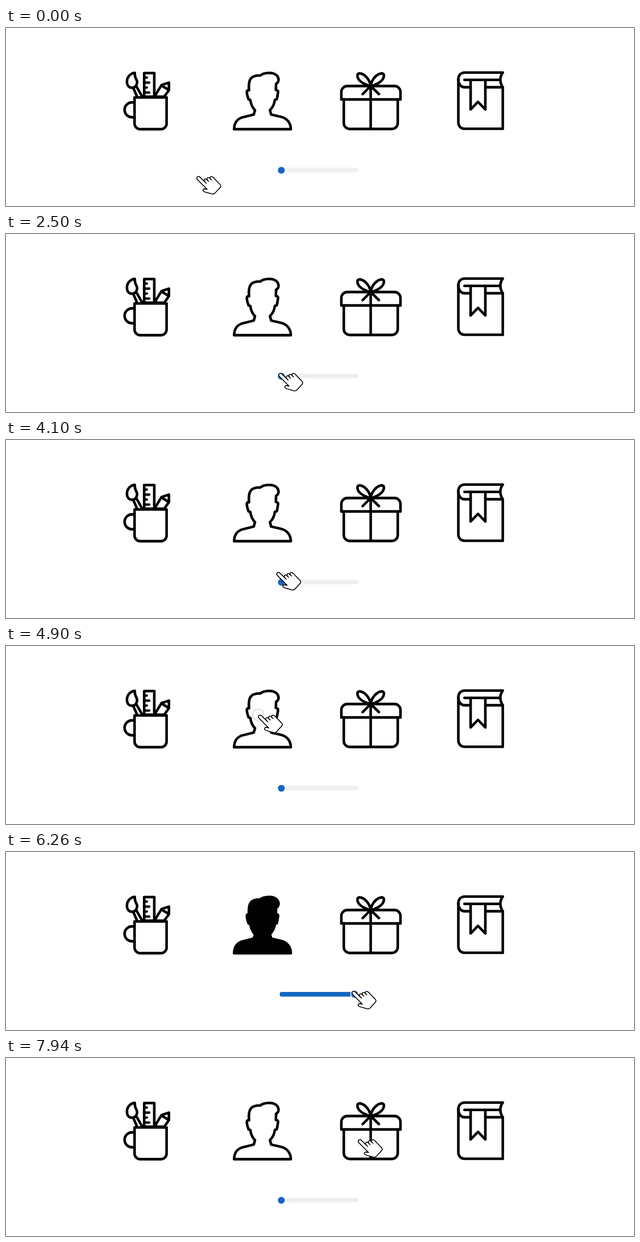
These frames come from a looping animation (1280x365 px, 8000 ms). An HTML page:

```html
<!DOCTYPE html>
<html lang="en">
<head>
<meta charset="utf-8">
<title>Icon fill slider</title>
<style>
  html, body { margin: 0; width: 100%; height: 100%; overflow: hidden; background: #fff; }
  svg { display: block; width: 100vw; height: 100vh; }
  .icon { fill: none; stroke: #000; stroke-width: 5.3; stroke-linecap: round; stroke-linejoin: round; }
  .solid { fill: #000; stroke: none; }
</style>
</head>
<body>
<svg viewBox="0 0 1280 365">
  <defs>
    <path id="mugShape" d="M262 142.3H327.3V196A11.5 11.5 0 0 1 315.8 207.5H273.5A11.5 11.5 0 0 1 262 196Z
      M262.5 92C252 93 246.5 102 246.5 110C246.5 118 251 122.5 257 122.5C264 122.5 268 116 267 109C266 104 262 103 262.5 92Z
      M281.7 141V92.3H302.2V141Z
      M302.5 141L317 117L332 112V127.5L322.5 141Z"/>
    <path id="personShape" d="M465 207.5C465 194 472 185 485 182.5L505 177.5L507.5 168.5C502 163 499 156 498 147.5
      L494.5 146.5C492.5 141 490.5 135 491 131C491 128.5 493 127.5 495.5 127.5C494.5 119 495 112 497 107
      C500 100 508 97 518 97.5C524 92.5 534 91.5 542 92.5C550 94 555 99 555.5 106C555.5 110 553 113 550.5 114.5
      L550 127C553 127.5 555 129 554.5 131.5C554 136 553 141 552 146L548 147.5C547 156 543.5 163 538 168.5
      L540.5 177.5L560 182C573 185 580.5 195 580.5 207.5Z"/>
  </defs>

  <use id="mugFill" href="#mugShape" class="solid"/>
  <use id="personFill" href="#personShape" class="solid"/>

  <g class="icon">
    <use href="#mugShape"/>
    <path d="M261 152.5H257A15.2 15.2 0 0 0 257 183H261"/>
    <path d="M259.5 123L267 140.5M266.5 121L277.5 140.5M317 118L331 126.5"/>
    <path d="M282 101.7H287M282 112H292M282 122.2H287M282 132.3H292" stroke-width="4.8"/>
  </g>
  <g class="icon"><use href="#personShape"/></g>
  <g class="icon">
    <path d="M683.5 146.5V131A12 12 0 0 1 695.5 119H792A12 12 0 0 1 804 131V146.5Z"/>
    <path d="M688.5 146.5V195A12 12 0 0 0 700.5 207H786.5A12 12 0 0 0 798.5 195V146.5M743.3 119V207"/>
    <path d="M743.3 119C741.5 105 730 93 720 93C714 94 716 103 721 108C727 114 735 117 743.3 119
      C745 105 756.5 93 766.5 93C772.5 94 770.5 103 765.5 108C759.5 114 751.5 117 743.3 119"/>
    <path d="M727 135.5L743.3 119L760 135.5"/>
  </g>
  <g class="icon">
    <path d="M1012.5 91.3H935C927 91.3 922 97 922 105V194.5A12.5 12.5 0 0 0 934.5 206.7H1012.5V121.5
      C1006 112 1006 100 1012.5 91.3"/>
    <path d="M922 105C922 115 927 121.5 935 121.5H945M979 121.5H1012.5M934.5 106.3H1006"/>
    <path d="M947 106.3V167L962 151.5L977 167V106.3"/>
  </g>

  <rect x="558" y="286.5" width="160.5" height="9.5" rx="4.5" fill="#f0f0f0"/>
  <rect id="bar" x="558" y="287" height="9.6" rx="3.5" fill="#1565c0"/>
  <circle id="halo" cy="291.7" r="9" fill="#e3ecf7"/>
  <circle id="knob" cy="291.7" r="7" fill="#1565c0"/>

  <circle id="ripple" fill="none" stroke="#8a8a8a" stroke-width="1.6"/>
  <g id="hand" fill="#fff" stroke="#000" stroke-width="1.8" stroke-linecap="round" stroke-linejoin="round">
    <path d="M1.6 6.6C.4 5.2 .8 2.6 2.2 1.6C3.9 .6 5.9 .8 7.1 2L17 11.8C14.5 8.5 16.8 6 18.8 6
      C20 6 21 6.8 22.6 8.6C20.5 5 22.5 3.2 24.3 3.2C25.7 3.2 26.8 4 28.4 5.7C26.8 2.5 29 .9 30.8 .9
      C32.4 .9 33.6 1.9 35 3.4L48 17C50.2 19.4 50.4 21 48.8 23.2L38 35C36.2 37.2 34.4 37.4 31.6 36.7
      L17.5 32.8C14 31.8 12.6 29.4 14 27.4C15.2 25.7 17 26.2 22 27.4Z"/>
    <path d="M17 11.8L20 14.8M22.6 8.6L25 11M28.4 5.7L30.8 8.2" fill="none"/>
  </g>
</svg>
<script>
const LOOP = 8000;
const TRAVEL = 150;
const $ = id => document.getElementById(id);
const clamp = v => Math.min(1, Math.max(0, v));

// cubic-bezier(.25, .1, .25, 1)
function ease(p) {
  if (p <= 0 || p >= 1) return clamp(p);
  const curve = (a, b, s) => 3 * a * s * (1 - s) ** 2 + 3 * b * s * s * (1 - s) + s ** 3;
  let lo = 0, hi = 1;
  for (let i = 0; i < 24; i++) {
    const mid = (lo + hi) / 2;
    if (curve(.25, .25, mid) < p) lo = mid; else hi = mid;
  }
  return curve(.1, 1, lo);
}

// Each step is [start, duration, ...target values]
const follow = (first, steps, t) => steps.reduce((now, [start, span, ...to]) => {
  const k = ease((t - start) / span);
  return now.map((v, i) => v + (to[i] - v) * k);
}, first);

const rest = [388, 303.5];
const moves = [
  [715, 500, 296, 162.5],
  [1935, 500, 555, 284.7],
  [4050, 500, 513.5, 140.7],
  [5255, 500, 555, 284.7],
  [7345, 500, 717, 166.5],
];
const drags = [[2512, 490, 1], [3015, 720, 0], [5832, 470, 1], [6305, 715, 0]];
const clicks = [[1285, 296, 162.5], [4620, 514, 141], [7930, 717, 167]];
const CLICK_SPAN = 550;

function set(id, attrs) {
  for (const key in attrs) $(id).setAttribute(key, attrs[key]);
}

function draw(t) {
  const [x, y] = follow(rest, moves, t);
  const [level] = follow([0], drags, t);
  const shift = TRAVEL * level;
  const knobX = 561.2 + shift;

  set('hand', { transform: `translate(${x + shift} ${y})` });
  set('knob', { cx: knobX });
  set('halo', { cx: knobX, opacity: clamp(shift / 6) });
  set('bar', { width: shift + 3, opacity: level > 0 ? 1 : 0 });
  set('mugFill', { opacity: t < 4000 ? level : 0 });
  set('personFill', { opacity: t < 4000 ? 0 : level });

  const click = clicks.find(([start]) => t >= start && t < start + CLICK_SPAN);
  if (click) {
    const p = (t - click[0]) / CLICK_SPAN;
    set('ripple', { cx: click[1], cy: click[2], r: 14.2 * ease(p), opacity: .8 * (1 - p) });
  } else {
    set('ripple', { opacity: 0 });
  }
}

const begin = performance.now();
function tick() {
  draw((performance.now() - begin) % LOOP);
  requestAnimationFrame(tick);
}
draw(0);
requestAnimationFrame(tick);
</script>
</body>
</html>
```
